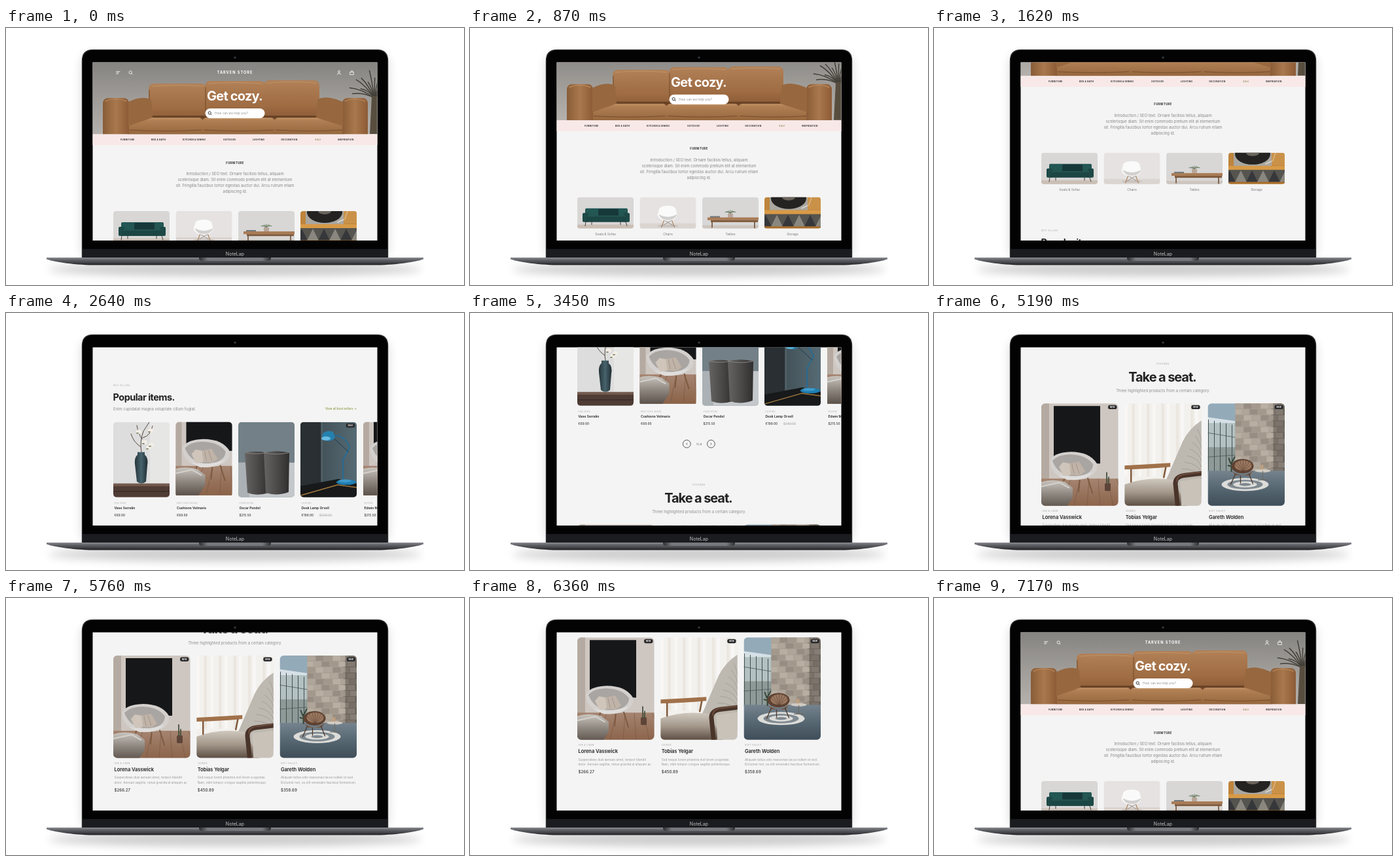
These frames come from a looping animation (700x393 px, 7.2 s). An HTML page:

```html
<!DOCTYPE html>
<html lang="en">
<head>
<meta charset="utf-8">
<title>Store scroll</title>
<style>
html, body { margin: 0; width: 100%; height: 100%; overflow: hidden; background: #fff; }
svg { display: block; width: 100vw; height: 100vh; font-family: Inter, "Liberation Sans", sans-serif; }
</style>
</head>
<body>
<svg id="stage" viewBox="0 0 700 393"></svg>
<script>
const LOOP = 7200;

// Drawing helpers, each returning markup
const rect = (x, y, w, h, fill, r = 0, more = '') =>
  `<rect x="${x}" y="${y}" width="${w}" height="${h}" rx="${r}" fill="${fill}" ${more}/>`;
const oval = (x, y, rx, ry, fill, more = '') =>
  `<ellipse cx="${x}" cy="${y}" rx="${rx}" ry="${ry}" fill="${fill}" ${more}/>`;
const shape = (d, fill, more = '') => `<path d="${d}" fill="${fill}" ${more}/>`;
const line = (d, stroke, w = 1) =>
  `<path d="${d}" fill="none" stroke="${stroke}" stroke-width="${w}" stroke-linecap="round" stroke-linejoin="round"/>`;
const text = (x, y, size, str, fill = '#222', weight = 400, spacing = 0, anchor = 'start') =>
  `<text x="${x}" y="${y}" font-size="${size}" fill="${fill}" font-weight="${weight}" letter-spacing="${spacing}" text-anchor="${anchor}">${str.replace(/&/g, '&amp;')}</text>`;
const center = (y, size, str, fill, weight, spacing, x = 350) => text(x, y, size, str, fill, weight, spacing, 'middle');
const photo = (x, y, clip, art) => `<g transform="translate(${x} ${y})" clip-path="url(#${clip})">${art}</g>`;
const grad = (id, stops, dir = 'x2="0" y2="1"') => `<linearGradient id="${id}" ${dir}>` +
  stops.map(([o, c]) => `<stop offset="${o}" stop-color="${c}"/>`).join('') + '</linearGradient>';
const clip = (id, x, y, w, h, r) => `<clipPath id="${id}">${rect(x, y, w, h, '#000', r)}</clipPath>`;
const badge = (x, y, w, str) => rect(x, y, w, 6.4, '#29292b', 3.2) + center(y + 4.3, 3, str, '#fff', 700, .1, x + w / 2);
const repeat = (n, fn) => Array.from({ length: n }, (_, i) => fn(i)).join('');

const defs = '<defs>' +
  clip('screen', 132.5, 52.5, 435, 272.5, 0) + clip('hero', 132.5, 52, 435, 110.5, 0) +
  clip('small', 0, 0, 86, 48, 4) + clip('tall', 0, 0, 86, 115, 5) + clip('big', 0, 0, 117.5, 156.5, 6) +
  grad('wall', [[0, '#8b8986'], [.5, '#a5a29e'], [1, '#bcb9b4']]) +
  grad('leather', [[0, '#b9865a'], [.6, '#a57046'], [1, '#8b5a34']]) +
  grad('seat', [[0, '#bd8a5c'], [1, '#946339']]) +
  grad('arm', [[0, '#8f6039'], [.5, '#b07d50'], [1, '#925f38']], 'x2="1" y2="0"') +
  grad('vase', [[0, '#24343b'], [.5, '#48636c'], [1, '#1f2c32']], 'x2="1" y2="0"') +
  grad('stool', [[0, '#666462'], [.5, '#4d4b4a'], [1, '#2f2e2e']], 'x2="1" y2="0"') +
  grad('room', [[0, '#30383c'], [.4, '#45535a'], [1, '#566b74']], 'x2="1" y2="0"') +
  grad('floor', [[0, '#75838e'], [.5, '#566772'], [1, '#3f4d58']]) +
  grad('boards', [[0, '#a58470'], [1, '#8a6248']]) +
  grad('rough', [[0, '#c9c4be'], [.5, '#8e8780'], [1, '#5b524b']]) +
  grad('cloth', [[0, '#cfc8be'], [.5, '#a3978a'], [1, '#5c4e44']]) +
  grad('metal', [[0, '#8e8f94'], [.3, '#636469'], [.65, '#45464a'], [1, '#1d1d20']]) +
  grad('sheen', [[0, '#2c2c2e'], [.12, '#77787d'], [.88, '#77787d'], [1, '#2c2c2e']], 'x2="1" y2="0"') +
  '<filter id="blur" x="-20%" y="-100%" width="140%" height="300%"><feGaussianBlur stdDeviation="7"/></filter></defs>';

function heroArt() {
  const frond = i => {
    const a = -2.95 + i * .2, len = 34 + 9 * Math.sin(i * 2.3);
    const x = 563 + len * Math.cos(a), y = 107 + len * Math.sin(a);
    return line(`M563 107Q${563 + len * .5 * Math.cos(a)} ${101 + len * .5 * Math.sin(a)} ${x} ${y}`, '#45423a', 1.5);
  };
  const cushion = (x, y, w, h) =>
    rect(x, y, w, h, 'url(#leather)', 8) +
    line(`M${x + 5} ${y + 4}Q${x + w / 2} ${y + 1} ${x + w - 5} ${y + 4}`, '#c69a6e', 1) +
    line(`M${x + 1} ${y + 10}V${y + h - 4}`, '#714a2a', .9);
  const seat = (x, w) => rect(x, 137, w, 32, 'url(#seat)', 6) +
    line(`M${x + 3} 156Q${x + w / 2} 159 ${x + w - 3} 156`, '#794f2c', 1) +
    line(`M${x + 5} 139H${x + w - 5}`, '#cc9f70', .9);
  const arm = (x, w) => rect(x, 107, w, 62, 'url(#arm)', 8) +
    line(`M${x + 4} 112Q${x + w / 2} 105 ${x + w - 4} 112`, '#c49366', 1.2);
  return rect(132, 52, 436, 111, 'url(#wall)') +
    repeat(15, frond) + shape('M556 162L559 104H567V162Z', '#5c5142') +
    cushion(218, 85, 88, 62) + cushion(394, 80, 85, 64) + cushion(304, 81, 92, 64) +
    rect(186, 134, 330, 30, '#6d4628') +
    seat(186, 115) + seat(300, 111) + seat(410, 107) +
    arm(148, 40) + arm(514, 39) +
    shape('M187 113Q210 102 222 110L224 137L187 150Z', '#9d6c42') +
    shape('M515 113Q490 102 476 109L474 137L515 150Z', '#9d6c42') +
    rect(132, 52, 436, 111, '#000', 0, 'opacity=".04"');
}

const seats = rect(0, 0, 86, 48, '#d9d7d6') + rect(0, 42, 86, 6, '#cbbfb5') +
  rect(12, 17, 65, 17, '#235754', 2) + rect(32, 18, 31, 11, '#173839', 2) +
  rect(8, 24, 9, 14, '#1d4947', 2) + rect(71, 24, 9, 14, '#1d4947', 2) +
  rect(14, 28, 60, 10, '#1b4644', 1) + line('M15 29H73', '#39706b', .6) +
  line('M13 38L12 44M74 38L76 44M66 38V42M22 38V42', '#3c3029', .9);

const chair = rect(0, 0, 86, 48, '#e5e2e1') + rect(0, 40, 86, 8, '#dbd5d1') +
  oval(43, 44, 16, 2, '#c9c2bd') + line('M38 33L33 46M48 33L53 46', '#a27a54', 1.1) +
  line('M37 35L50 43M49 35L36 43', '#55504c', .5) +
  shape('M30 17Q33 13 43 13Q53 13 55 18L57 27Q55 36 43 36Q30 36 27 27Z', '#fafafa') +
  shape('M29 26Q43 34 57 26Q54 35 43 35Q32 35 29 26Z', '#d2d0cf');

const table = rect(0, 0, 86, 48, '#d8d7d6') + rect(0, 43, 86, 5, '#cdc5be') +
  repeat(7, i => line(`M43 25Q${39 + i} ${22 - i % 2} ${35 + i * 2.7} ${20 + Math.abs(i - 3) * .9}`, '#6c8065', 1)) +
  rect(39, 25, 8, 6, '#b9a59a', 1) + rect(12, 29, 15, 2.4, '#71777b') +
  rect(8, 31, 78, 4.2, '#a97c56') + rect(13, 35.2, 72, 3, '#805a3c') +
  line('M15 38V46M80 38V47', '#6f4e36', 1.6);

const storage = rect(0, 0, 86, 48, '#be843c') + rect(8, 0, 58, 20, '#aaa7a0') +
  oval(37, 2, 27, 16, '#242322') + oval(37, 0, 10, 5, '#6b655e') +
  line('M72 0L68 12L57 17', '#dedbd5', 1.6) + rect(66, 0, 20, 19, '#d29b50', 0, 'opacity=".6"') +
  rect(0, 20, 86, 6, '#d89a47') + rect(0, 26, 86, 21, '#55544f') +
  repeat(6, i => shape(`M${i * 17 - 8} 47L${i * 17 + 2} 27L${i * 17 + 12} 47Z`, i % 2 ? '#89877f' : '#35373a')) +
  line('M0 46H86', '#a86e2c', 3);

const vase = rect(0, 0, 86, 115, '#dddddd') + rect(56, 0, 30, 94, '#e6e6e5') +
  line('M43 46Q40 30 46 14L55 0M44 26Q38 18 36 5M45 24Q57 21 60 6M42 38Q31 31 27 18', '#54483f', 1) +
  [[54, 39], [48, 31], [58, 35], [39, 15], [57, 13]].map(([x, y]) => oval(x, y, 4, 3.2, '#f3eee5') + oval(x - 2, y + 2, 2, 1, '#7e8269')).join('') +
  shape('M37 46H48V50Q54 55 52 66L50 91Q43 97 36 91L33 64Q32 54 37 50Z', 'url(#vase)') +
  rect(0, 94, 86, 21, '#4f3c35') + rect(0, 94, 86, 4, '#735a4e') + line('M0 106H86', '#2e2522', 1);

// Lounge chair before a dark panel, shared by several cards
const lounge = rect(-5, 0, 130, 160, '#cec6c0') + rect(-5, 0, 17, 120, '#b5aaa1') +
  rect(-5, 115, 130, 45, 'url(#boards)') + repeat(6, i => line(`M${45 + i * 14} 116L${30 + i * 20} 157`, '#755542', .6)) +
  rect(19, 4, 71, 88, '#161719') +
  line('M36 112L29 139M70 111L78 137M59 114L57 135', '#7d5a40', 2) +
  shape('M13 88Q18 75 45 74Q74 74 85 92Q88 107 68 115Q46 120 29 113Q14 104 13 88Z', '#d3d0ce') +
  shape('M17 88Q25 78 45 78Q69 79 79 93Q79 107 58 111Q27 114 17 88Z', '#a9a5a2') +
  shape('M27 97L33 90L44 92L46 109L34 111Z', '#d0c5ba') + shape('M43 92L58 89L67 104L59 110L45 109Z', '#c0b3a7') +
  line('M47 93L50 107M53 92L58 107', '#97897d', .7) +
  shape('M25 109Q48 116 78 106Q67 118 40 117Z', '#e0dedc') +
  rect(97, 122, 9, 12, '#5d4438', 2) + line('M100 122V106M103 122V113', '#47513f', 1.8) +
  shape('M-5 122Q14 114 36 120L48 129V144L38 160H-5Z', 'url(#rough)') +
  line('M0 127L28 121L42 129', '#d5d1cc', 2);
const loungeCrop = `<g transform="translate(-3 -48)">${lounge}</g>`;

const stools = rect(0, 0, 86, 115, '#738087') + rect(0, 62, 86, 53, '#c5c8cb') + rect(0, 62, 17, 53, '#abb1b5') +
  shape('M10 47Q28 43 43 47L47 108Q28 114 14 108Z', 'url(#stool)') +
  shape('M39 47Q58 42 78 47L77 107Q59 114 42 108Z', 'url(#stool)') +
  line('M11 47Q28 50 42 47M40 47Q58 51 77 47', '#878481', 1);

const lamp = rect(0, 0, 86, 115, 'url(#room)') + rect(0, 0, 31, 100, '#292f32') + line('M33 0V90', '#657b85', .8) +
  shape('M0 98L58 87L86 94V115H0Z', '#17191a') + line('M1 112L57 96L86 100', '#a3793d', 1.5) +
  line('M45 21Q67 17 75 39L65 58V91', '#296b93', 2) + line('M50 24L73 45', '#183c52', 1) +
  oval(70, 92, 15, 4, '#1f7fb3') + oval(68, 90, 10, 2.2, '#3f9acc') +
  shape('M33 20Q37 11 50 15L53 24Q46 32 35 27Z', '#2580ae') + oval(39, 25, 7, 3, '#68bce2');

const daylight = rect(0, 0, 118, 157, '#f3f1ed') +
  repeat(11, i => rect(i * 11 + 2 * Math.sin(i * 3), 0, 4.5, 112, i % 2 ? '#e8e4dd' : '#fbfaf8', 0, 'opacity=".75"')) +
  shape('M118 26Q99 38 89 58L64 116L82 142H118Z', '#bdb8b0') +
  repeat(7, i => line(`M${112 - i * 4} ${40 + i * 10}Q${118 - i} ${52 + i * 8} 118 ${62 + i * 9}`, '#a29d95', .9)) +
  shape('M0 124Q35 111 74 117L96 157H0Z', 'url(#cloth)') +
  shape('M0 95Q38 93 70 91V97Q38 100 0 101Z', '#a0714a') +
  line('M10 101V120M63 98L60 113', '#80583c', 2.5) +
  line('M81 155L78 125Q76 112 92 110L118 107', '#49342a', 7) + line('M80 119Q80 109 94 108L118 105', '#765240', 1.5) +
  shape('M85 119L118 114V157H87Z', '#c8c2b9');

const patio = rect(0, 0, 118, 157, '#d6e1e7') + shape('M0 0H49V28L0 21Z', '#93aab9') +
  rect(0, 30, 43, 77, '#b3c1c2') + rect(0, 67, 43, 38, '#8d9a97') +
  repeat(5, i => line(`M${i * 9 + 1} ${25 + i * 2}V107`, '#434c50', 1)) + line('M0 45L42 52M0 82L42 79', '#4d5558', .8) +
  rect(42, 0, 56, 106, '#a79d91') + rect(97, 0, 21, 108, '#7d766e') +
  repeat(12, r => repeat(6, i => rect(42 + i * 13 - r % 2 * (i && 4), r * 9, 12, 8, ['#afa599', '#978d82', '#a3988c', '#b8aea2'][(r * 3 + i * 5) % 4], .5))) +
  rect(100, 0, 18, 104, '#57504a', 0, 'opacity=".5"') +
  rect(0, 103, 118, 54, 'url(#floor)') +
  [[36, 10], [27, 7.2], [18, 4.6], [9, 2.2]].map(([a, b], i) => oval(57, 124, a, b, i % 2 ? '#7f8990' : '#dcdcd9')).join('') +
  line('M36 104V90M35 92L32 84M37 90L41 82M35 96L31 95', '#39483a', 2) +
  '<g transform="translate(-8 2)">' + oval(61, 94, 17, 11, '#5f4232') + oval(62, 93, 13, 8, '#9a7860') +
  repeat(7, i => line(`M62 103L${47 + i * 5} ${88 - 4 * Math.sin(i * Math.PI / 6)}`, '#593f30', .6)) +
  shape('M44 101Q62 115 78 100L72 108H51Z', '#765540') + line('M50 106L43 122M71 106L77 121M58 109V120', '#4c382c', 1.3) + '</g>' +
  oval(84, 103, 12, 2.5, '#d0cbc3') + line('M84 104V117M77 117H92', '#6f6b65', 1.2) + rect(80, 94, 5, 7, '#bd9f80', 1);

function pageMarkup() {
  const columns = [164, 259.5, 355, 450, 546];
  const wide = [164, 291.2, 418.5];
  const nav = [[175, 'FURNITURE'], [222, 'BED & BATH'], [270, 'KITCHEN & DINING'], [332, 'OUTDOOR'],
    [377, 'LIGHTING'], [420.5, 'DECORATION'], [472, 'SALE'], [507, 'INSPIRATION']];
  const intro = ['Introduction / SEO text. Ornare facilisis tellus, aliquam',
    'scelerisque diam. Sit enim commodo pretium elit at elementum',
    'sit. Fringilla faucibus tortor egestas auctor dui. Arcu rutrum etiam', 'adipiscing id.'];
  const categories = [['Seats & Sofas', seats], ['Chairs', chair], ['Tables', table], ['Storage', storage]];
  const products = [['FINE VASES', 'Vase Serralin', '€69.00', vase],
    ['MUST HAVE DESIGN', 'Cushions Velmaris', '€69.00', loungeCrop],
    ['LIVING ROOM', 'Oscar Pendel', '$215.50', stools],
    ['LIGHTING', 'Desk Lamp Orvell', '€199.00', lamp], ['SEATING', 'Edwin Marl', '$215.50', loungeCrop]];
  const featured = [
    ['OAK & LINEN', 'Lorena Vasswick', '$266.27', lounge,
      'Suspendisse duis aenean amet, tempor blandit', 'dolor. Aenean sagittis, netus gravida at aliquam ac'],
    ['LOUNGE', 'Tobias Yelgar', '$450.89', daylight,
      'Sed neque lorem pharetra nisl lorem a egestas.', 'Nam, nibh tempor congue sagittis pellentesque.'],
    ['SOFT VALLEY', 'Gareth Wolden', '$358.69', patio,
      'Aliquam tellus odio maecenas lacus nullam et sed.', 'Dictumst non, eu elit venenatis faucibus fermentum.']];
  const pager = (x, dir) => `<circle cx="${x}" cy="628.3" r="5.9" fill="none" stroke="#333" stroke-width=".8"/>` +
    line(`M${x - dir * .7} 626.9L${x + dir * .7} 628.3L${x - dir * .7} 629.7`, '#333', .7);

  return rect(132, 52, 436, 1000, '#f4f4f4') +
    `<g clip-path="url(#hero)">${heroArt()}</g>` +
    line('M168.7 66.5H174M168.7 68.3H172.5M168.7 70.1H171.3', '#fff', .7) +
    '<circle cx="190.2" cy="67.9" r="2.2" fill="none" stroke="#fff" stroke-width=".8"/>' + line('M191.9 69.6L193.3 71', '#fff', .8) +
    '<circle cx="509" cy="66.7" r="1.5" fill="none" stroke="#fff" stroke-width=".8"/>' +
    line('M506.4 71.2Q506.6 69 509 69Q511.4 69 511.6 71.2M526 67.4H531.3V71.3H526ZM527.3 67.2V66.6A1.35 1.35 0 0 1 530 66.6V67.2', '#fff', .8) +
    center(70.3, 5.6, 'TARVEN STORE', '#fff', 700, 1) +
    center(111, 20, 'Get cozy.', '#fff', 700, -.8, 349.5) +
    rect(304.5, 123, 91, 15, '#fff', 7.5) +
    '<circle cx="311.2" cy="129.9" r="2.1" fill="none" stroke="#222" stroke-width=".9"/>' + line('M312.8 131.5L314.2 132.9', '#222', .9) +
    text(319, 132.2, 4.8, 'How can we help you?', '#909090') +
    rect(132, 162.5, 436, 16.6, '#f8e9e8') +
    nav.map(([x, s]) => text(x, 171.9, 3.4, s, s === 'SALE' ? '#a39a72' : '#333', 700, .25)).join('') +
    center(207.6, 4.2, 'FURNITURE', '#222', 700, .4) +
    intro.map((s, i) => center(225 + i * 9.1, 5.9, s, '#858585')).join('') +
    categories.map(([s, art], i) => photo(columns[i], 280, 'small', art) +
      center(338, 4.8, s, '#777', 400, 0, columns[i] + 43)).join('') +
    text(164, 400.3, 3, 'BEST SELLERS', '#aaa', 400, .35) +
    text(163.6, 422, 14.5, 'Popular items.', '#222', 700, -.55) +
    text(164, 437.6, 5.9, 'Enim cupidatat magna voluptate cillum fugiat.', '#8c8c8c') +
    text(536, 436, 4.5, 'View all best sellers →', '#8c9a45', 500, 0, 'end') +
    products.map(([brand, name, price, art], i) => {
      const x = columns[i] + 1.5;
      return photo(columns[i], 455, 'tall', art) + text(x, 580, 2.8, brand, '#aaa', 400, .25) +
        text(x, 588, 5, name, '#222', 600) + text(x, 599.5, 4.6, price, '#333', 500, .1);
    }).join('') +
    badge(519.5, 457, 14, 'SALE') + text(479, 599.5, 4.6, '$349.00', '#aaa', 400, .1) + line('M479 597.9H498', '#aaa', .5) +
    pager(331.3, -1) + pager(368.4, 1) + center(629.8, 4.1, '1 / 3', '#333', 500) +
    center(692.2, 3, 'FEATURED', '#999', 400, .5) +
    center(717.7, 20, 'Take a seat.', '#222', 700, -1.1, 349) +
    center(734.5, 5.9, 'Three highlighted products from a certain category.', '#8c8c8c') +
    featured.map(([brand, name, price, art, a, b], i) => {
      const x = wide[i] + 1.5;
      return photo(wide[i], 751.3, 'big', art) + badge(x + 100.5, 753.8, 13.5, 'NEW') +
        text(x, 917, 3, brand, '#999', 400, .5) + text(x, 928, 7.5, name, '#222', 600, -.05) +
        text(x, 939.5, 4.7, a, '#999') + text(x, 947.3, 4.7, b, '#999') + text(x, 959.2, 6, price, '#333', 500, .1);
    }).join('');
}

const laptop =
  rect(113, 38, 474, 316, '#000', 18, 'opacity=".1" filter="url(#blur)"') +
  oval(350, 369, 285, 11, '#000', 'opacity=".2" filter="url(#blur)"') +
  shape('M115.8 351V50Q115.8 32.7 133 32.7H567Q584.2 32.7 584.2 50V351Z', '#2d2d30') +
  shape('M117 351V50.5Q117 34 133.5 34H566.5Q583 34 583 50.5V351Z', '#030303') +
  rect(117, 338, 466, 13, '#1b1c1f') +
  '<circle cx="350" cy="45.2" r="1.9" fill="#24262b"/><circle cx="350" cy="45.2" r=".8" fill="#4a5260"/>' +
  center(347.6, 7, 'NoteLap', '#c4c4c6', 400, .05) +
  shape('M62 351H638V353.5C626 358 594 362.6 560 362.6H140C106 362.6 74 358 62 353.5Z', 'url(#metal)') +
  shape('M295 351H405V352Q405 356 400 356H300Q295 356 295 352Z', 'url(#sheen)');

const stage = document.getElementById('stage');
stage.innerHTML = defs + laptop + `<g clip-path="url(#screen)"><g id="page">${pageMarkup()}</g></g>`;
const page = document.getElementById('page');

// Scroll keys: time, offset, speed
const keys = [[0, 0, 0], [1620, 89, .13], [2640, 288, .19], [3450, 428, .15], [5190, 613, .085],
  [6360, 691, 0], [6700, 110, -.8], [7050, 0, 0], [LOOP, 0, 0]];

function scrollAt(t) {
  const i = keys.findIndex(k => k[0] > t);
  const [t0, a, va] = keys[i - 1], [t1, b, vb] = keys[i];
  const d = t1 - t0, u = (t - t0) / d, v = 1 - u;
  return v * v * ((1 + 2 * u) * a + u * d * va) + u * u * ((3 - 2 * u) * b - v * d * vb);
}

const start = performance.now();
function draw() {
  const y = scrollAt((performance.now() - start) % LOOP);
  page.setAttribute('transform', `translate(0 ${-y.toFixed(2)})`);
  requestAnimationFrame(draw);
}
draw();
</script>
</body>
</html>
```
